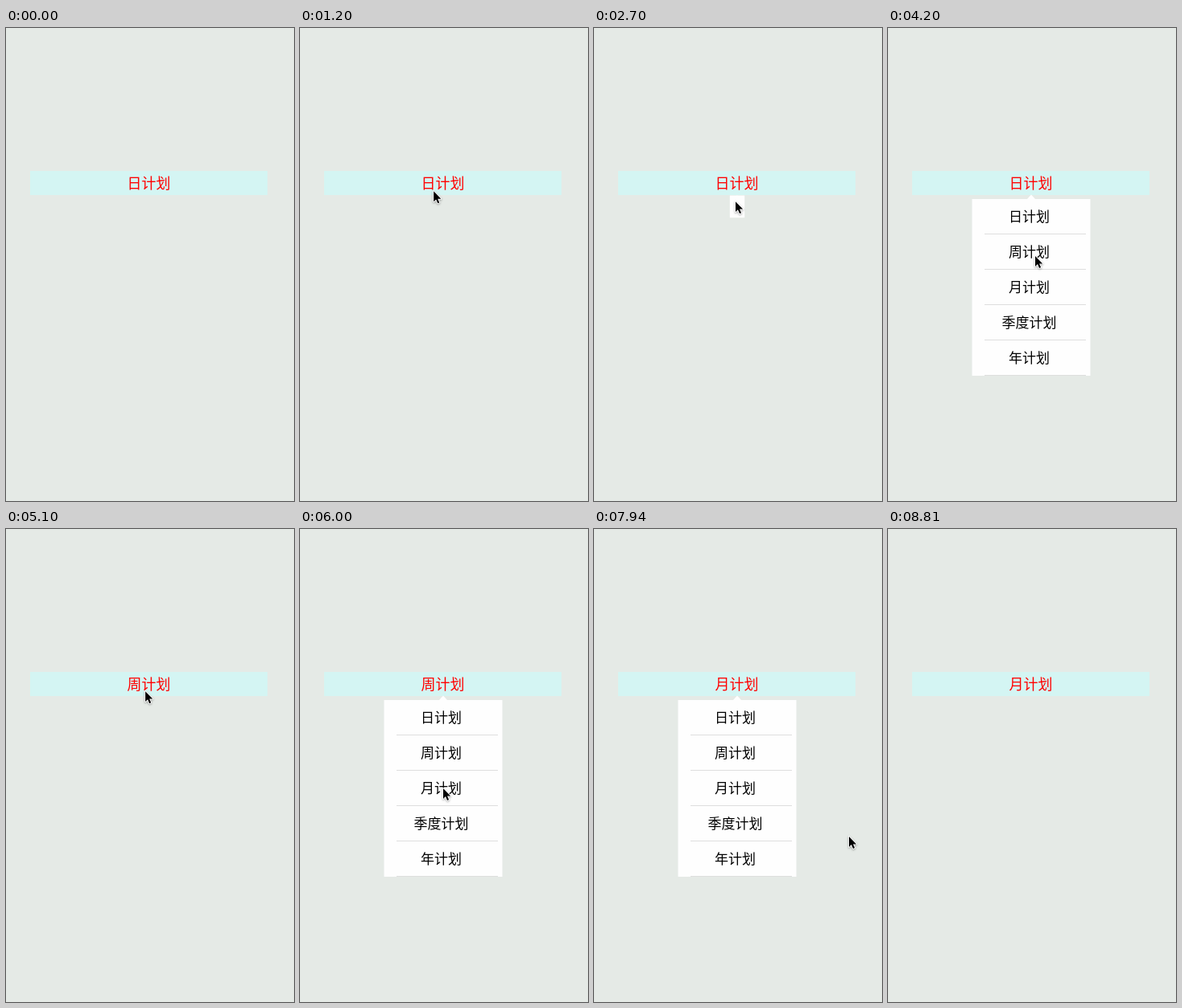
Write an HTML page with a canvas that moves like this. It is 358 px wide and 589 px high and loops after 8.96 s.

```html
<!DOCTYPE html>
<html lang="zh-CN">
<head>
<meta charset="utf-8">
<title>计划</title>
<style>
html, body { margin: 0; width: 100%; height: 100%; overflow: hidden; background: #e5eae6; }
canvas { display: block; width: 358px; height: 589px; }
</style>
</head>
<body>
<canvas id="stage"></canvas>
<script>
const W = 358, H = 589, LOOP = 8960;
const FONT = '"Noto Sans CJK SC", "Noto Sans CJK", "Noto Sans CJK JP", sans-serif';
const ITEMS = ['日计划', '周计划', '月计划', '季度计划', '年计划'];
const MENU = { x: 104.5, y: 213, w: 147, h: 220, row: 44, tipX: 178, tipY: 208 };
const ANIM = 250;       // menu grow / shrink time
const TEXT_DELAY = 400; // rows show up once the menu has settled

// Each visit to the menu: when it opens, when it closes, the row picked
const VISITS = [
  { open: 1550, close: 2475, pick: 0 },
  { open: 3350, close: 4425, pick: 1 },
  { open: 5450, close: 6225, pick: 2 },
  { open: 7100, close: 7960, pick: 2 }
];

// Pointer enters, shuttles between title and menu, then leaves
const POINTER = { from: 450, to: 8800, x: 277, y: 494 };
const MOVES = [
  { from: 450, to: 1350, x: 162, y: 194 },
  { from: 1800, to: 2100, x: 178, y: 230 },
  { from: 2550, to: 3150, x: 171, y: 196 },
  { from: 3600, to: 4200, x: 182, y: 283 },
  { from: 4500, to: 5400, x: 171, y: 191 },
  { from: 5700, to: 6000, x: 177, y: 322 },
  { from: 6300, to: 6900, x: 171, y: 187 },
  { from: 7350, to: 7930, x: 316, y: 382 },
  { from: 8230, to: 8800, x: 326, y: 582 }
];

const canvas = document.getElementById('stage');
const ctx = canvas.getContext('2d');
const dpr = window.devicePixelRatio || 1;
canvas.width = W * dpr;
canvas.height = H * dpr;

const clamp = p => Math.max(0, Math.min(1, p));
const mix = (a, b, p) => a + (b - a) * p;
const easeInOut = p => p * p * (3 - 2 * p);
const easeOut = p => 1 - (1 - p) * (1 - p);

// The picture advances in steps of 150 ms, slightly shorter near the end
function stepTime(t) {
  const late = 7800, short = 1010 / 7;
  if (t < late) return Math.floor(t / 150) * 150;
  return late + Math.floor((t - late + 10) / short) * short;
}

function rect(x, y, w, h, color) {
  ctx.fillStyle = color;
  ctx.fillRect(x, y, w, h);
}

function text(str, x, y, size, color) {
  ctx.font = '350 ' + size + 'px ' + FONT;
  ctx.textAlign = 'center';
  ctx.fillStyle = color;
  ctx.fillText(str, x, y);
}

function drawTitle(t) {
  const done = VISITS.filter(v => t >= v.close).pop();
  rect(30, 178, 295, 30, '#d4f5f3');
  text(ITEMS[done ? done.pick : 0], 177.5, 200, 18, '#ff0000');
}

function drawMenu(t) {
  const visit = VISITS.find(v => t >= v.open && t < v.close + ANIM);
  if (!visit) return;
  const { open, close } = visit;
  const grown = easeInOut(clamp((t - open) / ANIM));
  const shrunk = easeInOut(clamp((t - close) / ANIM));
  const size = mix(0.1, 1, grown - shrunk);
  const { x, y, w, h, row, tipX, tipY } = MENU;

  ctx.save();
  ctx.translate(tipX, tipY);
  ctx.scale(size, size);
  ctx.translate(-tipX, -tipY);
  rect(x, y, w, h, '#fefefe');
  ctx.beginPath();
  ctx.moveTo(tipX, tipY - 0.5);
  ctx.lineTo(tipX + 5.5, y + 0.5);
  ctx.lineTo(tipX - 5.5, y + 0.5);
  ctx.fill();
  if (t >= open + TEXT_DELAY && t < close) {
    ITEMS.forEach((item, i) => {
      const top = y + i * row;
      text(item, 175.5, top + 28, 17, '#000');
      rect(120, top + row - 1, 126, 1, '#dedede');
    });
  }
  ctx.restore();
}

function pointerAt(t) {
  let { x, y } = POINTER;
  for (const m of MOVES) {
    const p = easeOut(clamp((t - m.from) / (m.to - m.from)));
    x = mix(x, m.x, p);
    y = mix(y, m.y, p);
  }
  return [x, y];
}

function drawPointer(t) {
  if (t < POINTER.from || t >= POINTER.to) return;
  const shape = new Path2D('M0 0V14L3.2 11L5.5 16.2L7.7 15.3L5.5 10.2H10Z');
  ctx.save();
  ctx.translate(...pointerAt(t));
  ctx.translate(1, 1);
  ctx.scale(0.92, 0.92);
  ctx.lineJoin = 'round';
  ctx.lineWidth = 2;
  ctx.strokeStyle = '#fff';
  ctx.shadowColor = 'rgba(0,0,0,0.35)';
  ctx.shadowBlur = 2.5 * dpr;
  ctx.shadowOffsetY = dpr;
  ctx.stroke(shape);
  ctx.shadowColor = 'transparent';
  ctx.fillStyle = '#000';
  ctx.fill(shape);
  ctx.restore();
}

function draw(time) {
  const t = stepTime(time % LOOP);
  ctx.setTransform(dpr, 0, 0, dpr, 0, 0);
  rect(0, 0, W, H, '#e5eae6');
  drawTitle(t);
  drawMenu(t);
  drawPointer(t);
}

let start = null;
function tick(now) {
  if (start === null) start = now;
  draw(Math.max(0, now - start));
  requestAnimationFrame(tick);
}
draw(0);
requestAnimationFrame(tick);
</script>
</body>
</html>
```
